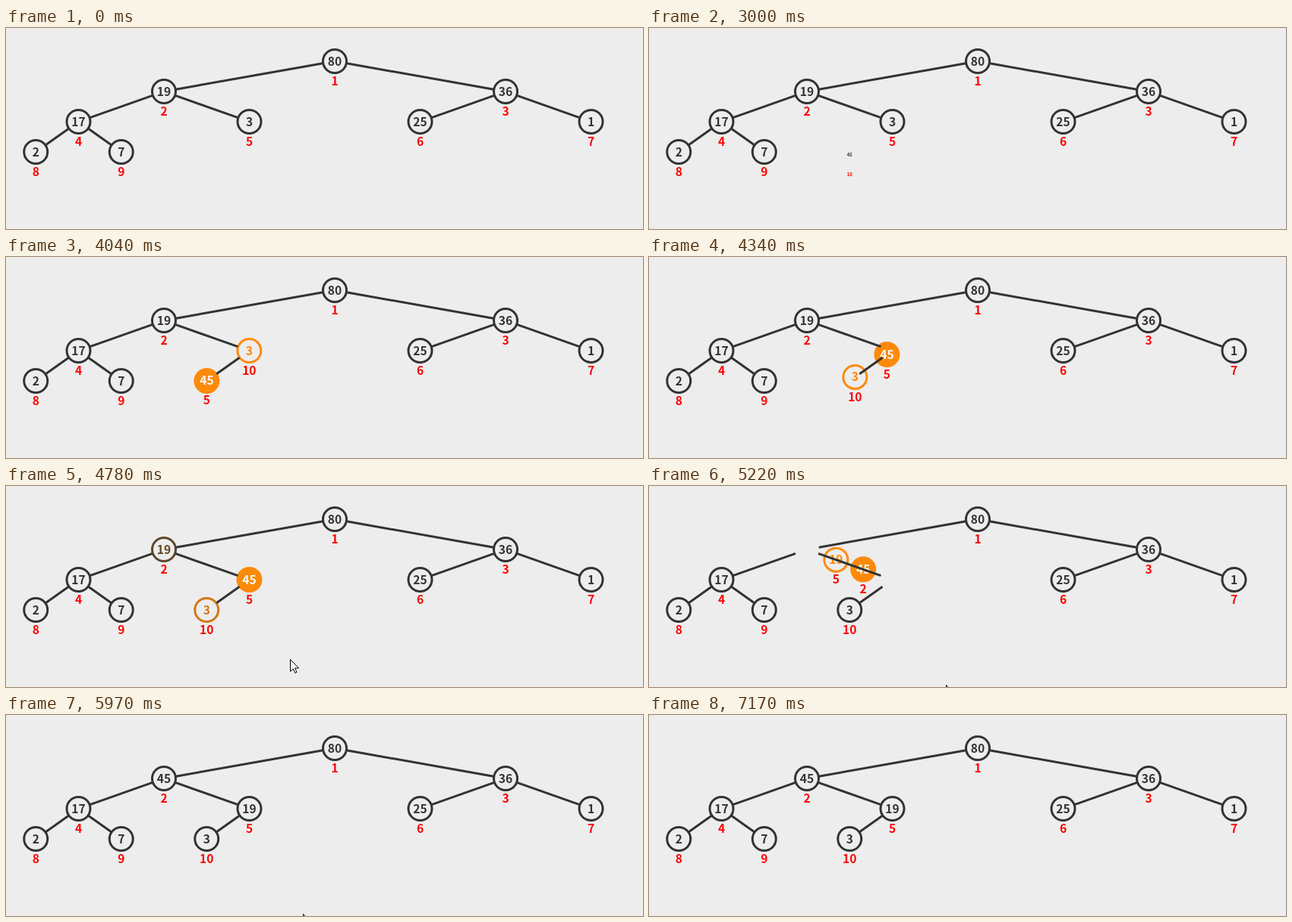
Write an HTML page that moves like this. It is 839 px wide and 266 px high and loops after 9120 ms.

```html
<!DOCTYPE html>
<html lang="en">
<head>
<meta charset="utf-8">
<title>Binary heap insertion</title>
<style>
  html, body { margin: 0; width: 100%; height: 100%; overflow: hidden; background: #ededed; }
  svg { display: block; width: 839px; height: 266px; }
  text {
    font-family: "Noto Sans CJK JP", "Noto Sans CJK SC", "Noto Sans CJK KR", "Open Sans", sans-serif;
    font-weight: 700;
    text-anchor: middle;
  }
</style>
</head>
<body>
<svg id="stage" viewBox="0 0 839 266"></svg>
<script>
const LOOP = 9120;
const STEP = 500;
const FONT = 15.6;
const BG = [237, 237, 237], DARK = [51, 51, 51], ORANGE = [255, 138, 8], WHITE = [255, 255, 255];

// Start of each stage of the insertion
const GROW = 2975, MARK_LEAF = 3475, SWAP_LEAF = 3998, MARK_INNER = 4590, SWAP_INNER = 5000, SETTLE = 5500;

// The picture is refreshed only at these moments
const TICKS = [0, 3000, 3140, 3290, 3440, 3590, 3740, 3890, 4040, 4190, 4340, 4490,
  4640, 4780, 4930, 5070, 5220, 5370, 5520, 5670, 5820, 5970, 7170];

// Pointer tip at given times; null hides it
const POINTER = [[0, null], [4780, [374, 229]], [4930, [386, 218]], [5070, [386, 216]],
  [5220, [391, 263]], [7170, null]];

const stage = document.getElementById("stage");

function add(parent, tag, attrs = {}) {
  const el = document.createElementNS("http://www.w3.org/2000/svg", tag);
  set(el, attrs);
  parent.appendChild(el);
  return el;
}

function set(el, attrs) {
  for (const key in attrs) el.setAttribute(key, attrs[key]);
}

const lerp = (a, b, p) => a + (b - a) * p;
const mix = (a, b, p) => `rgb(${a.map((v, i) => Math.round(lerp(v, b[i], p)))})`;

// Cubic ease in and out over one stage
function stageAt(time, start) {
  const t = Math.min(1, Math.max(0, (time - start) / STEP));
  return t < 0.5 ? 4 * t ** 3 : 1 - 4 * (1 - t) ** 3;
}

// Centre of a heap slot, counted from 1
function slotPos(slot) {
  const level = Math.floor(Math.log2(slot));
  const gap = 900 / 2 ** level;
  return [gap * (slot - 2 ** level + 0.5) - 17, 44 + 40 * level];
}

function between(from, to, p) {
  const a = slotPos(from), b = slotPos(to);
  return [lerp(a[0], b[0], p), lerp(a[1], b[1], p)];
}

const nodeLayer = add(stage, "g");
const edgeLayer = add(stage, "g", { stroke: mix(DARK, DARK, 0), "stroke-width": 3 });

function makeNode(value) {
  const g = add(nodeLayer, "g");
  const ring = add(g, "circle");
  const text = add(g, "text");
  const label = add(g, "text", { fill: "#f00" });
  text.textContent = value;
  return { g, ring, text, label };
}

// heat: orange amount, solid: whether the inside is coloured too
function drawNode(node, [x, y], slot, heat = 0, solid = false, size = 1) {
  const color = mix(DARK, ORANGE, heat);
  const font = Math.max(6, FONT * size);
  set(node.g, { transform: `translate(${x} ${y})` });
  set(node.ring, {
    r: 15.5 * size, "stroke-width": 3 * size, stroke: color,
    fill: solid ? mix(BG, ORANGE, heat) : mix(BG, BG, 0)
  });
  set(node.text, { y: 5.5, "font-size": font, fill: solid ? mix(DARK, WHITE, heat) : color });
  set(node.label, { y: 31.6, "font-size": font });
  if (node.label.textContent !== String(slot)) node.label.textContent = slot;
}

function drawEdge(line, child, p = 1) {
  const [x1, y1] = slotPos(child >> 1), [x2, y2] = slotPos(child);
  const len = Math.hypot(x2 - x1, y2 - y1);
  const ux = (x2 - x1) / len, uy = (y2 - y1) / len;
  const end = 16 + (len - 32) * p;
  set(line, { x1: x1 + ux * 16, y1: y1 + uy * 16, x2: x1 + ux * end, y2: y1 + uy * end });
}

const fixed = { 1: 80, 3: 36, 4: 17, 6: 25, 7: 1, 8: 2, 9: 7 };
for (const slot in fixed) drawNode(makeNode(fixed[slot]), slotPos(+slot), slot);
const inner = makeNode(19), leaf = makeNode(3), added = makeNode(45);

for (let child = 2; child < 10; child++) drawEdge(add(edgeLayer, "line"), child);
const newEdge = add(edgeLayer, "line");

const pointer = add(stage, "path", {
  d: "M.5 .5V16.5L4.2 13L6.8 18.5L9 17.5L6.5 12H11.5Z",
  fill: "#fff", stroke: "#000", "stroke-width": 1
});

function render(ms) {
  const time = TICKS.filter(t => t <= ms).pop();
  const at = start => stageAt(time, start);
  const grow = at(GROW), swapLeaf = at(SWAP_LEAF), swapInner = at(SWAP_INNER);
  const markInner = at(MARK_INNER), settle = at(SETTLE);
  const leafMoved = time >= SWAP_LEAF, innerMoved = time >= SWAP_INNER;

  drawNode(inner, between(2, 5, swapInner), innerMoved ? 5 : 2, markInner - settle);
  drawNode(leaf, between(5, 10, swapLeaf), leafMoved ? 10 : 5, at(MARK_LEAF) - markInner);

  const path = innerMoved ? between(5, 2, swapInner) : between(10, 5, swapLeaf);
  drawNode(added, path, innerMoved ? 2 : leafMoved ? 5 : 10, grow - settle, true, grow);
  set(added.g, { visibility: grow > 0 ? "visible" : "hidden" });

  drawEdge(newEdge, 10, grow);
  set(newEdge, { visibility: grow > 0.01 ? "visible" : "hidden" });

  const tip = POINTER.filter(p => p[0] <= time).pop()[1];
  set(pointer, { visibility: tip ? "visible" : "hidden" });
  if (tip) set(pointer, { transform: `translate(${tip})` });
}

function tick() {
  render(performance.now() % LOOP);
  requestAnimationFrame(tick);
}
tick();
</script>
</body>
</html>
```
